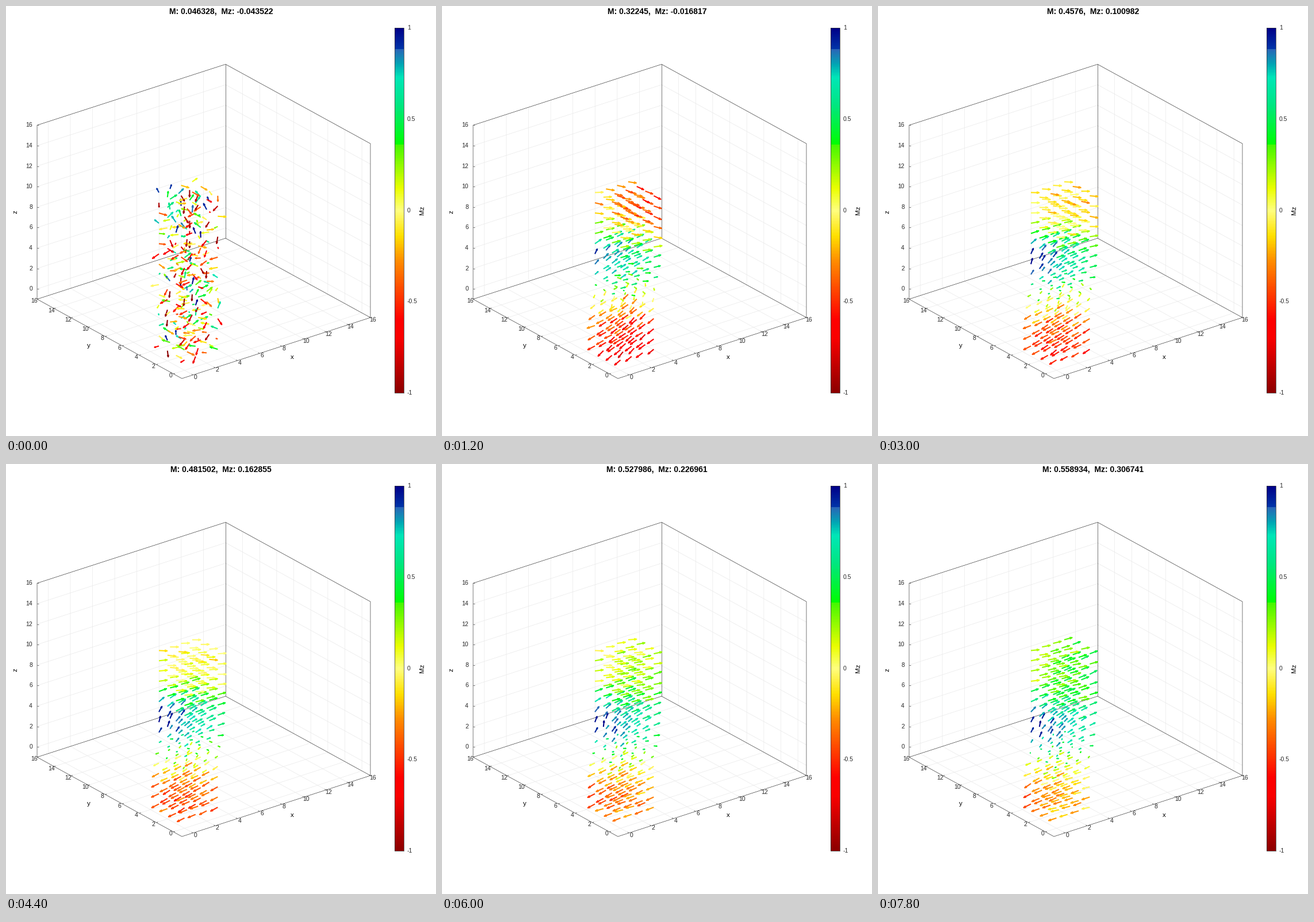
These frames come from a looping animation (748 by 748 pixels, 8 s). A matplotlib script:

```python
import numpy as np
import matplotlib.pyplot as plt
from matplotlib.animation import FuncAnimation
from matplotlib.collections import LineCollection
from matplotlib.colors import LinearSegmentedColormap

SIZE = 748
FRAMES, INTERVAL = 40, 200
PAUSES = {9, 16, 17, 18, 24, 25, 36, 37, 38}  # frames that repeat the state before
LAST_STEP = FRAMES - 1 - len(PAUSES)

# Oblique projection of the lattice onto the stage, in pixels per unit
CORNER = np.array([306.0, 648.0])
AXES = np.array([[19.29, -6.235], [-14.82, -8.12], [0.0, -17.8]])
LO, HI = -1, 16
RIGHT = np.array([0.793, -0.609, 0.0])   # horizontal, towards screen right
AWAY = np.array([0.609, 0.793, 0.0])     # horizontal, away from the viewer
ARROW = 0.6

STOPS = [
    (-1.00, "#8c0000"), (-0.70, "#fa0000"), (-0.60, "#ff0000"),
    (-0.28, "#ff8c00"), (-0.14, "#ffe000"), (0.00, "#ffff80"),
    (0.12, "#eaff00"), (0.36, "#44f800"), (0.36, "#00ff00"),
    (0.58, "#00e682"), (0.73, "#00e6b8"), (0.80, "#00a8b4"),
    (0.89, "#2c62b8"), (0.89, "#0034a8"), (1.00, "#000088"),
]
CMAP = LinearSegmentedColormap.from_list(
    "mz", [((v + 1) / 2, c) for v, c in STOPS], N=256)

# Magnetisation readings at a few steps; the title runs between them
STEPS = [0, 3, 9, 14, 18, 24, 30]
M_READ = [0.046328, 0.253787, 0.391112, 0.4576, 0.481502, 0.527986, 0.558934]
MZ_READ = [-0.043522, -0.05433, 0.020696, 0.100982, 0.162855, 0.226961, 0.306741]

SITES = np.stack(np.meshgrid(range(16), range(4), range(4), indexing="ij"),
                 axis=-1).reshape(-1, 3)[:, ::-1].astype(float)
RNG = np.random.default_rng(7)
JITTER = RNG.normal(size=(2, *SITES.shape))


def project(points):
    return CORNER + (np.asarray(points, dtype=float) - LO) @ AXES


def unit(v):
    return v / np.linalg.norm(v, axis=1, keepdims=True)


def sigmoid(v):
    return 1 / (1 + np.exp(-v))


def with_mean_mz(spins, mz):
    for _ in range(4):
        spins[:, 2] += mz - spins[:, 2].mean()
        spins = unit(spins)
    return spins


def spiral(step):
    """Domains the spins relax into: down below, up in the middle, flat on top."""
    t = step / LAST_STEP

    def lerp(a, b):
        return a + (b - a) * t

    z = SITES[:, 2]
    across = (SITES - 1.5) @ RIGHT
    middle = np.exp(-((z - lerp(9, 7.6)) / 3) ** 2)
    top = sigmoid(z - 11)
    bottom = sigmoid((3.5 - z) / 0.8)

    c = (middle * (0.78 - 0.12 * (1 - np.exp(-step / 6)) * across)
         + top * (lerp(-0.58, 0.25) + lerp(-0.11, 0.06) * across)
         + bottom * (lerp(-0.7, -0.35) + lerp(-0.06, 0.05) * across))
    c = np.clip(c, -0.95, 0.95)[:, None]
    turn = np.radians(-82 + 85 * np.tanh((z - 5.7) / 3))[:, None]
    flat = np.sqrt(1 - c**2)
    return flat * (np.cos(turn) * RIGHT + np.sin(turn) * AWAY) + c * [0, 0, 1]


def spins_at(step, mz):
    order = 1 - np.exp(-step / 1.5)
    heat = 0.07 + 0.9 * np.exp(-step / 1.8)
    drift = step / 6
    noise = np.cos(drift) * JITTER[0] + np.sin(drift) * JITTER[1]
    return with_mean_mz(unit(order * spiral(step) + heat * noise), mz)


def arrow_lines(spins):
    tail = project(SITES)
    d = ARROW * spins @ AXES
    tip = tail + d
    neck = tip - 0.3 * d
    side = 0.1 * np.column_stack([-d[:, 1], d[:, 0]])
    shafts = np.stack([tail, tip], axis=1)
    heads = np.stack([neck + side, tip, neck - side], axis=1)
    return [*shafts, *heads]


fig = plt.figure(figsize=(7.48, 7.48), dpi=100, facecolor="white")
ax = fig.add_axes([0, 0, 1, 1])
ax.axis("off")


def px(n):
    return n * 0.72


def label(x, y, s, size=10.4, **kw):
    style = dict(ha="center", va="center", color="#262626", family="Liberation Sans")
    return ax.text(x, y, s, fontsize=px(size), **{**style, **kw})


def axis_name(x, y, s, **kw):
    label(x, y, s, 11.5, color="black", **kw)


def lines(segments, color, z):
    ax.add_collection(LineCollection(segments, colors=color,
                                     linewidths=px(0.7), zorder=z))


def draw_box():
    grid = []
    for k in range(0, HI, 2):
        grid += [project(p) for p in (
            [(k, LO, LO), (k, HI, LO), (k, HI, HI)],
            [(LO, k, LO), (HI, k, LO), (HI, k, HI)],
            [(LO, HI, k), (HI, HI, k), (HI, LO, k)])]
    lines(grid, "#e9e9e9", 1)

    edges = [
        [(LO, HI, LO), (LO, LO, LO), (HI, LO, LO), (HI, HI, LO), (LO, HI, LO)],
        [(LO, HI, LO), (LO, HI, HI), (HI, HI, HI), (HI, LO, HI), (HI, LO, LO)],
        [(HI, HI, LO), (HI, HI, HI)],
    ]
    lines([project(e) for e in edges], "#404040", 2)

    ticks = []
    for k in range(0, HI + 1, 2):
        xt, yt, zt = project([(k, LO, LO), (LO, k, LO), (LO, HI, k)])
        ticks += [[xt, xt + (-2.5, -1.4)], [yt, yt + (2.8, -0.9)], [zt, zt + (3, 0)]]
        label(xt[0] + 4, xt[1] + 4, k)
        label(yt[0] - 5, yt[1] + 3.5, k)
        label(46, zt[1], k, ha="right")
    lines(ticks, "#404040", 2)

    axis_name(497.5, 611, "x")
    axis_name(144, 591, "y")
    axis_name(16, 358, "z", rotation=90)


def draw_colorbar():
    left, right, top, bottom = 676.5, 692.5, 38, 673
    ramp = np.linspace(1, -1, 256)[:, None]
    ax.imshow(ramp, cmap=CMAP, vmin=-1, vmax=1, aspect="auto",
              extent=(left, right, bottom, top), interpolation="nearest", zorder=1)
    ax.add_patch(plt.Rectangle((left, top), right - left, bottom - top, fill=False,
                               ec="#303030", lw=px(0.7), zorder=2))
    for v in (1, 0.5, 0, -0.5, -1):
        y = (top + bottom) / 2 - v * (bottom - top) / 2
        label(698, y, f"{v:g}", ha="left")
    axis_name(724, 355, "Mz", rotation=90)


draw_box()
draw_colorbar()
ax.set_xlim(0, SIZE)
ax.set_ylim(SIZE, 0)

title = label(374, 13.5, "", 14, weight="bold", color="black", va="baseline")
arrows = LineCollection([], linewidths=px(2.1), capstyle="butt", joinstyle="round",
                        zorder=3)
ax.add_collection(arrows)


def number(v):
    return f"{v:.6f}".rstrip("0")


def update(frame):
    step = frame - sum(p <= frame for p in PAUSES)
    m, mz = (np.interp(step, STEPS, read) for read in (M_READ, MZ_READ))
    spins = spins_at(step, mz)
    arrows.set_segments(arrow_lines(spins))
    arrows.set_color(np.tile(CMAP((spins[:, 2] + 1) / 2), (2, 1)))
    title.set_text(f"M: {number(m)},  Mz: {number(mz)}")
    return arrows, title


anim = FuncAnimation(fig, update, frames=FRAMES, interval=INTERVAL,
                     repeat=True, repeat_delay=0, blit=False)
plt.show()
```
